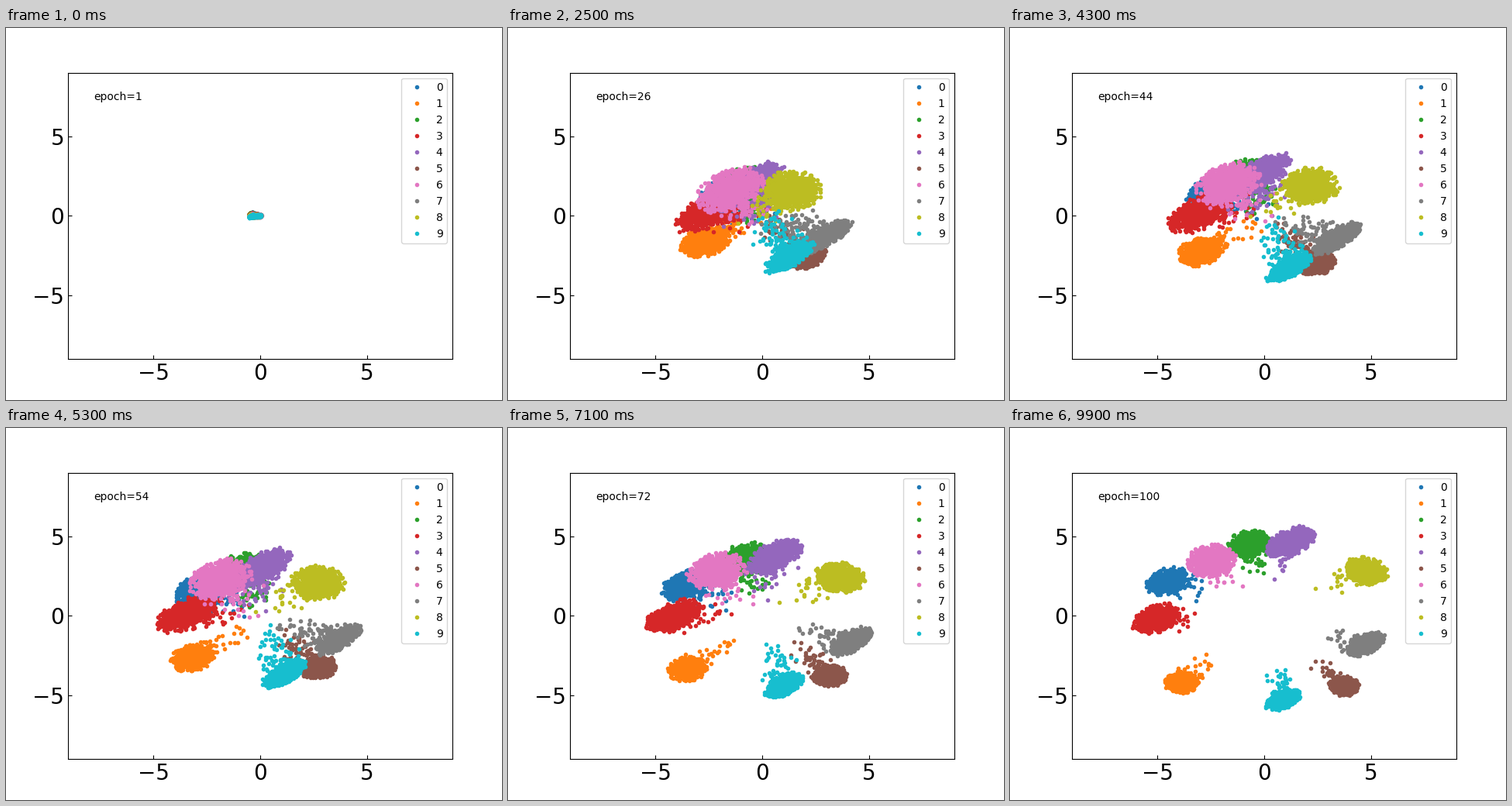
These frames come from a looping animation (640x480 px, 10000 ms). A matplotlib script:

```python
import numpy as np
import matplotlib.pyplot as plt
from matplotlib.animation import FuncAnimation

EPOCHS, POINTS, FORMED = 100, 1000, 17

# Per class: centre once formed, final centre, final size, tilt.
CLASSES = [
    ((-1.5, 1.35), (-4.54, 2.20), 0.39, 0.30),
    ((-2.65, -1.45), (-3.88, -4.17), 0.31, 0.05),
    ((-1.0, 1.70), (-0.73, 4.55), 0.38, 0.15),
    ((-2.3, 0.35), (-5.08, -0.17), 0.43, 0.40),
    ((-0.85, 1.80), (1.23, 4.65), 0.46, 0.50),
    ((1.9, -2.30), (3.74, -4.41), 0.27, 0.00),
    ((-1.45, 1.50), (-2.5, 3.48), 0.46, 0.15),
    ((2.8, -1.25), (4.75, -1.78), 0.34, 0.55),
    ((1.1, 1.55), (4.75, 2.85), 0.39, -0.20),
    ((1.3, -2.35), (0.87, -5.24), 0.32, 0.50),
]

rng = np.random.default_rng(7)
SHAPE = (len(CLASSES), POINTS)
RADIUS = np.sqrt(-2 * np.log(1 - 0.97 * rng.random(SHAPE)))  # sharp-edged blob
ANGLE = rng.uniform(0, 2 * np.pi, SHAPE)
SPIN = rng.normal(0, 0.03, SHAPE)
STRAY = rng.random(SHAPE)


def lerp(a, b, t):
    return a + (b - a) * t


def cloud(label, epoch):
    formed, final, size, tilt = CLASSES[label]
    # A fast burst away from the origin, then a slow drift outwards.
    burst = min(1, (epoch - 1) / (FORMED - 1)) ** 0.55
    p = max(0, (epoch - FORMED) / (EPOCHS - FORMED))
    drift = lerp(p, p * p * (3 - 2 * p), 0.4)

    seed = np.array([-0.42, 0.12 - 0.016 * label])
    cx, cy = lerp(seed, lerp(np.array(formed), np.array(final), drift), burst)
    sx = lerp(0.04, size * lerp(1.45, 1, drift), burst)
    sy = 0.87 * sx
    rho = tilt + 0.25 * (1 - drift)

    angle = ANGLE[label] + SPIN[label] * epoch
    u, v = RADIUS[label] * np.cos(angle), RADIUS[label] * np.sin(angle)
    # Stragglers lag behind on the way out from the origin.
    pull = lerp(1, 0.35, drift) * STRAY[label] ** (10 + 0.4 * epoch)
    x = cx * (1 - pull) + sx * u
    y = cy * (1 - pull) + sy * (rho * u + np.sqrt(1 - rho ** 2) * v)
    return x, y


fig, ax = plt.subplots(figsize=(6.4, 4.8), dpi=100)
ax.set(xlim=(-9, 9), ylim=(-9, 9), xticks=[-5, 0, 5], yticks=[-5, 0, 5])
ax.tick_params(direction="in", labelsize=20)
dots = [ax.plot([], [], ".", color=f"C{k}", label=str(k))[0]
        for k in range(len(CLASSES))]
ax.legend(loc="upper right")
caption = ax.text(-7.8, 7.3, "")


def update(frame):
    epoch = frame + 1
    for label, line in enumerate(dots):
        line.set_data(*cloud(label, epoch))
    caption.set_text(f"epoch={epoch}")
    return [*dots, caption]


anim = FuncAnimation(fig, update, frames=EPOCHS, interval=100,
                     repeat=True, repeat_delay=0, blit=False)
plt.show()
```
